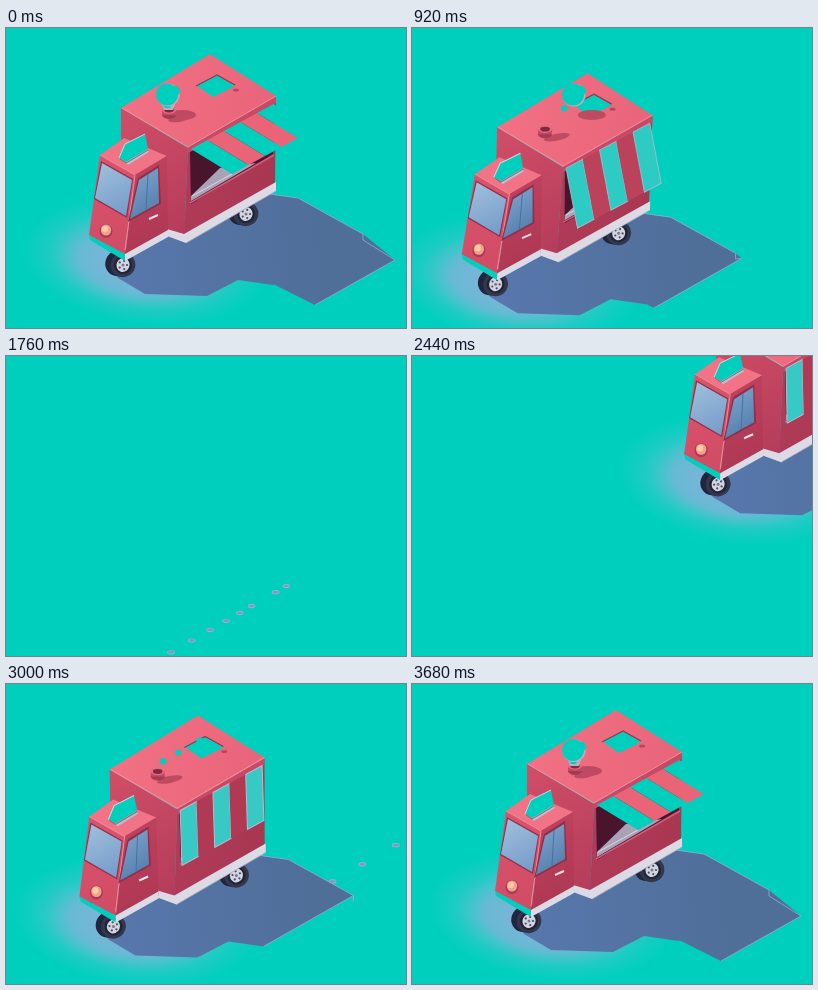
An HTML page with a canvas that plays this animation: 400x300 px, repeating every 3720 ms.

```html
<!DOCTYPE html>
<html lang="en">
<head>
<meta charset="utf-8">
<title>Food truck</title>
<style>
html, body { margin: 0; width: 100%; height: 100%; overflow: hidden; background: #00cfbe; }
canvas { display: block; width: 400px; height: 300px; }
</style>
</head>
<body>
<canvas id="stage" width="400" height="300"></canvas>
<script>
const ctx = document.getElementById('stage').getContext('2d');
const LOOP = 3720, TEAL = '#00cfbe', SLOPE = -0.575;

const clamp = v => Math.min(1, Math.max(0, v));
const ramp = (t, a, b) => clamp((t - a) / (b - a));
const smooth = (t, a, b) => { const p = ramp(t, a, b); return p * p * (3 - 2 * p); };
const backOut = p => 1 + 2.2 * (p - 1) ** 3 + 1.2 * (p - 1) ** 2;

// Horizontal distance of the truck from its parking place
function drive(t) {
  if (t < 600) return 0;
  if (t < 1700) return -176 * ((t - 600) / 640) ** 2.41;
  if (t < 2120) return 460;
  if (t < 2960) return -10 + 410 * (1 - ramp(t, 2120, 2960)) ** 1.5;
  return -10 * (1 - smooth(t, 2960, 3280));
}

// 1 = awning raised, 0 = shut
function awningOpen(t) {
  return t < 2000 ? 1 - smooth(t, 620, 1040) : backOut(ramp(t, 3120, 3520));
}

function pitch(t) {
  if (t < 1900) return 5 * smooth(t, 650, 950);
  return -2.5 * smooth(t, 2600, 2920) * (1 - smooth(t, 3000, 3280));
}

const puffs = [801];
for (let i = 0; i < 13; i++) puffs.push(927 + 42 * i);
for (let i = 0; i < 13; i++) puffs.push(2150 + 70 * i);

function trace(pts) {
  ctx.beginPath();
  pts.forEach(([x, y], i) => i ? ctx.lineTo(x, y) : ctx.moveTo(x, y));
}
function poly(fill, ...pts) {
  trace(pts);
  ctx.closePath();
  ctx.fillStyle = fill;
  ctx.fill();
}
function line(color, width, ...pts) {
  trace(pts);
  ctx.strokeStyle = color;
  ctx.lineWidth = width;
  ctx.stroke();
}
function oval(fill, x, y, rx, ry = rx, turn = 0) {
  if (rx <= 0 || ry <= 0) return;
  ctx.beginPath();
  ctx.ellipse(x, y, rx, ry, turn, 0, 7);
  ctx.fillStyle = fill;
  ctx.fill();
}
function shade(x0, y0, x1, y1, a, b) {
  const g = ctx.createLinearGradient(x0, y0, x1, y1);
  g.addColorStop(0, a);
  g.addColorStop(1, b);
  return g;
}

function puffShadow(x, y, rx) {
  if (rx < 0.4) return;
  oval('#a9b4dc', x, y, rx + 0.6, rx * 0.5 + 0.5);
  oval('#8199bd', x, y, rx, rx * 0.45);
}

function bigPuff(t) {
  if (t < 1920) return 1 - ramp(t, 1050, 1920) * 0.98;
  return smooth(t, 3280, 3620);
}

function smallPuff(t, born) {
  const end = born < 2000 ? 1920 : 3280;
  return ramp(t, born, born + 60) * (1 - ramp(t, end - 160, end));
}

function groundPuffs(t) {
  const drift = t < 2000 ? Math.max(0, t - 1240) * 0.02 : 0;
  for (const born of puffs) {
    const d = drive(born);
    puffShadow(270 + d + drift, 230 + d * SLOPE, 3.2 * smallPuff(t, born));
  }
  if (t < 1920 && t > 600) puffShadow(270 + drift, 230, 13 * (1 - ramp(t, 1240, 1920)));
}

function halo() {
  ctx.save();
  ctx.translate(140, 232);
  ctx.rotate(0.12);
  ctx.scale(1, 0.52);
  const g = ctx.createRadialGradient(-10, 10, 0, 0, 0, 124);
  g.addColorStop(0, 'rgba(150,172,222,.95)');
  g.addColorStop(0.5, 'rgba(150,176,222,.68)');
  g.addColorStop(0.75, 'rgba(140,190,216,.22)');
  g.addColorStop(1, 'rgba(120,200,210,0)');
  ctx.fillStyle = g;
  ctx.fillRect(-130, -130, 260, 260);
  ctx.restore();
}

function groundShadow(open) {
  const fill = shade(110, 240, 320, 220, '#5878ae', '#4f6e98');
  const out = clamp(open);
  poly(fill, [100, 236], [112, 250], [139, 266], [201, 268], [232, 252], [267, 257],
    [357, 206], [292, 170], [262, 166], [180, 190]);
  if (out > 0) {
    poly(fill, [257, 251], [267 + 42 * out, 257 + 20 * out],
      [357 + 32 * out, 206 + 26 * out], [357, 206], [290, 200]);
  }
  line('#9aa9d6', 0.8, [267 + 42 * out, 257 + 20 * out],
    [357 + 32 * out, 206 + 26 * out], [357, 212], [357, 206], [292, 170], [264, 166]);
}

function wheel(x, y, spin) {
  oval('#20263d', x - 3, y - 1, 14, 13, -0.5);
  oval('#33374c', x + 1, y + 1, 12.5, 12, -0.5);
  oval('#1f2438', x + 1, y + 1, 9, 9, -0.5);
  oval('#d5d5e2', x + 1, y + 1, 6.5, 7, 0.4);
  for (let i = 0; i < 5; i++) {
    const a = spin + i * Math.PI * 0.4;
    oval('#4b4d63', x + 1 + 4 * Math.cos(a), y + 1 + 4.3 * Math.sin(a), 1.1);
  }
  oval('#777b91', x + 1, y + 1, 1.5);
}

function awning(open) {
  const a = open * Math.PI / 2;
  const dx = 40 * Math.sin(a) + 1, dy = 25 * Math.sin(a) + 55 * Math.cos(a);
  const at = i => [185 + 16.5 * i, 121 - 9 * i];
  const lit = clamp(open);
  const red = `rgb(${176 + 58 * lit},${58 + 42 * lit},${84 + 36 * lit})`;
  for (let i = 0; i < 5; i++) {
    const [x0, y0] = at(i), [x1, y1] = at(i + 1);
    const pts = [[x0, y0], [x1, y1], [x1 + dx, y1 + dy], [x0 + dx, y0 + dy]];
    poly(i % 2 ? red : TEAL, ...pts);
    if (i % 2 === 0 && lit < 0.98) {
      ctx.globalAlpha = 1 - lit;
      poly('rgba(160,190,208,.35)', ...pts);
      line('#bcb9cf', 1, ...pts, pts[0]);
      ctx.globalAlpha = 1;
    }
  }
}

function box(open) {
  poly(shade(115, 90, 180, 200, '#cf4d67', '#b53d5b'),
    [115, 80], [182, 120], [178, 207], [115, 190]);
  poly(shade(182, 130, 270, 150, '#b13b58', '#a83752'),
    [182, 120], [270, 70], [269, 155], [178, 207]);
  poly('#48152d', [184, 124], [267, 78], [267, 126], [185, 176]);
  poly('#a9a3b8', [185, 168], [214, 140], [250, 135], [185, 173]);
  line('#ddd8e3', 1, [186, 168], [226, 146]);
  line('#d45c75', 1.5, [184, 175], [268, 127]);
  poly('#dcdbe5', [178, 206], [270, 154], [270, 163], [180, 215], [161, 208], [161, 201]);
  line('#a7a9bf', 0.8, [180, 215], [270, 163]);

  poly(shade(130, 60, 250, 90, '#f17083', '#e9657b'),
    [115, 80], [204, 26], [270, 68], [182, 119]);
  poly('#c64a65', [182, 119], [270, 68], [270, 75], [182, 125]);
  line('#f78c9a', 1, [116, 80], [182, 119], [270, 68]);
  poly(TEAL, [190, 57], [211, 47], [229, 58], [207, 69]);
  line('#96384f', 1.3, [190, 58], [211, 47], [229, 57]);
  oval('#b9475f', 230, 62, 3, 1.6);
  awning(open);
}

function chimney() {
  oval('#c04a62', 175, 90, 13, 3.5, -0.2);
  oval('#a43b55', 163, 87, 7, 4);
  ctx.fillStyle = '#c24a62';
  ctx.fillRect(156, 82, 14, 5);
  oval('#e9697f', 163, 82, 7, 3.7);
  oval('#7c2942', 163, 82, 4.8, 2.4);
}

function cab() {
  poly('#f07486', [94, 127], [118, 110], [161, 128], [129, 147]);
  poly(shade(90, 140, 120, 225, '#d9536b', '#d04b64'),
    [94, 127], [129, 147], [119, 229], [83, 207]);
  poly(shade(130, 150, 160, 210, '#bd405c', '#ae3854'),
    [129, 147], [161, 128], [162, 206], [119, 229]);
  line('#f28a98', 1, [94, 127], [129, 147], [119, 222]);

  poly('#8f324e', [95, 133], [127, 151], [121, 190], [88, 171]);
  poly(shade(95, 140, 120, 188, '#9cbcda', '#749bc9'),
    [96, 135], [126, 152], [120, 188], [89, 170]);
  poly('#8e304b', [132, 150], [153, 137], [155, 176], [122, 194]);
  poly(shade(130, 150, 152, 180, '#789fc9', '#557fae'),
    [133, 152], [152, 140], [153, 175], [124, 191]);
  line('#4b7199', 1, [142, 146], [140, 182]);
  line('#f1e3e8', 2, [143, 191], [152, 187]);

  poly(TEAL, [83, 207], [119, 226], [119, 233], [84, 212]);
  poly('#dcdbe5', [119, 226], [162, 202], [162, 209], [119, 233]);

  oval('#a83c55', 100, 203, 6.5, 7);
  oval('#f2a18a', 100, 202, 5.2, 5.6);
  oval('#ffc8a4', 99, 201, 3, 3.3);

  poly('#b9bdd0', [119, 134], [141, 121], [143, 124], [122, 137]);
  poly(TEAL, [113, 130], [119, 116], [139, 106], [142, 121], [120, 134]);
  line('#d4d2de', 1, [113, 130], [119, 116], [139, 106]);
  line('#a85c72', 1, [114, 131], [120, 135], [142, 122]);
}

// White steam blends with the backdrop and shows only over the truck
function steam(t, d) {
  for (const born of puffs) {
    const p = drive(born);
    if (t >= born) oval(TEAL, 163 + p, 74 + p * SLOPE, 3.2 * smallPuff(t, born));
  }
  const s = bigPuff(t);
  if (s <= 0) return;
  const y = 80 - 13 * s + 0.8 * Math.sin(t / LOOP * Math.PI * 12) * s;
  if (Math.abs(d) < 6) {
    poly('#c3a9bb', [158, 82], [154, y + 4], [171, y + 4], [167, 82]);
    poly(TEAL, [159, 80], [154, y + 4], [167, y + 4], [164, 80]);
  }
  if (Math.abs(d) < 90) oval('#c5aabd', 162, y, 11.6 * s, 11.4 * s);
  oval(TEAL, 161, y - 0.6, 11 * s);
  oval(TEAL, 169, y - 4 * s, 5 * s);
}

function draw(t) {
  ctx.fillStyle = TEAL;
  ctx.fillRect(0, 0, 400, 300);
  groundPuffs(t);

  const d = drive(t), open = awningOpen(t), lean = pitch(t) / 180;
  const shake = t < 600 ? 0.4 * Math.sin(t / 600 * Math.PI * 10) : 0;
  ctx.save();
  ctx.translate(d, d * SLOPE);
  halo();
  groundShadow(open);
  wheel(239, 185, d / -13);
  wheel(116, 236, d / -13);
  ctx.transform(1, 0, -lean, 1, lean * 210, shake);
  box(open);

  const s = bigPuff(t);
  if (s > 0 && d > -90 && d < 90) {
    ctx.save();
    trace([[115, 80], [204, 26], [270, 68], [182, 119]]);
    ctx.clip();
    oval('#bd4a62', 176 - d, 87 - d * SLOPE, 14 * s, 5 * s);
    ctx.restore();
  }
  chimney();
  cab();
  ctx.restore();
  steam(t, d);
}

const start = performance.now();
function tick() {
  draw((performance.now() - start) % LOOP);
  requestAnimationFrame(tick);
}
tick();
</script>
</body>
</html>
```
